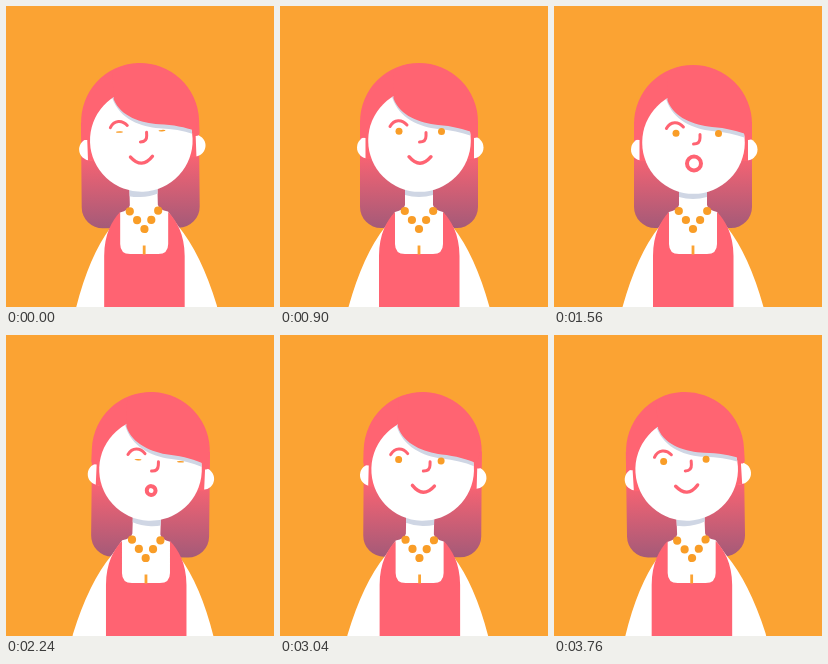
An HTML page for the animation above (3800 ms loop, 268 by 301 pixels).

```html
<!DOCTYPE html>
<html lang="en">
<head>
<meta charset="utf-8">
<title>Swaying portrait</title>
<style>
  html, body { margin: 0; width: 100%; height: 100%; overflow: hidden; background: #fba333; }
  svg { display: block; width: 100%; height: 100%; }
  .line { fill: none; stroke: #ff6372; stroke-linecap: round; }
</style>
</head>
<body>
<svg viewBox="0 0 268 301">
  <defs>
    <linearGradient id="fade" gradientUnits="userSpaceOnUse" x1="0" y1="144" x2="0" y2="222">
      <stop offset="0" stop-color="#ff6472"/>
      <stop offset="1" stop-color="#a45a78"/>
    </linearGradient>
    <clipPath id="neckClip"><rect x="125" y="170" width="28" height="40"/></clipPath>
    <clipPath id="faceClip"><circle cx="139.5" cy="134.5" r="51.3"/></clipPath>
  </defs>
  <rect width="268" height="301" fill="#fba333"/>

  <path id="backHair" fill="url(#fade)" d="M80 116H198V201A21 21 0 0 1 177 222H101A21 21 0 0 1 80 201Z"/>

  <g id="body">
    <path fill="#fff" d="M125 170V199Q124 204 115 206L105 221Q83 249 68.500 301L64 325H214L209.500 301Q195 249 173 221L163 206Q154 204 153 199V170Z"/>
    <g clip-path="url(#neckClip)"><circle id="chinShade" cx="139" cy="139" r="52" fill="#cfd6e4"/></g>
    <g id="beads" fill="#f99d27"></g>
  </g>
  <g id="dress">
    <path fill="#ff6372" d="M115 206V238Q115 248 125 248H153Q163 248 163 238V206C171 214 179.500 228 179.500 250V325H99V250C99 228 107 214 115 206Z"/>
    <path d="M139 239.500V248.500" stroke="#fba333" stroke-width="2.800"/>
  </g>

  <g id="head">
    <circle cx="88" cy="141.500" r="11" fill="#fff"/>
    <circle cx="192.500" cy="141.500" r="11" fill="#fff"/>
    <path fill="#ff6472" d="M80 116A59 59 0 0 1 198 116V129Q198 132 194 132V153H85.500V132Q80 132 80 129Z"/>
    <circle cx="139.500" cy="134.500" r="51.300" fill="#fff"/>
    <g clip-path="url(#faceClip)">
      <path fill="#cfd6e4" d="M112 91C119 113 140 121 158 123C172 124 184 127 194 131V80H113Z"/>
    </g>
    <path fill="#ff6472" d="M113.500 92.500C120 110 140 117 158 119C172 120 184 123 194 127L197 112A58 58 0 0 0 113 64Z"/>
  </g>

  <g id="face">
    <path id="brow" class="line" stroke-width="3" d="M110 120.500C114 113 122 113 127 119"/>
    <path class="line" stroke-width="3" d="M146 126.500V130Q146 136 139.500 136"/>
    <ellipse id="eyeL" cy="125.300" rx="3.500" fill="#f99d27"/>
    <ellipse id="eyeR" cy="125.500" rx="3.500" fill="#f99d27"/>
    <path id="smile" class="line" stroke-width="3.400"/>
    <circle id="ring" class="line" cx="140" cy="155.500" stroke-width="4"/>
  </g>
</svg>
<script>
  const LOOP = 3800;
  const $ = id => document.getElementById(id);
  const set = (id, attrs) => {
    for (const k in attrs) $(id).setAttribute(k, attrs[k]);
  };

  // Smooth step from 0 to 1 between the times a and b.
  function ease(t, a, b) {
    const p = Math.min(1, Math.max(0, (t - a) / (b - a)));
    return p * p * (3 - 2 * p);
  }

  // Eyelid opening: shut around the time mid.
  const blink = (t, mid) => .22 + .78 * ease(Math.abs(t - mid), 40, 130);

  for (let i = -2; i <= 2; i++) {
    $("beads").innerHTML += `<circle cx="${139 + 7.1 * i}" cy="${223 - 9 * Math.abs(i)}" r="4.1"/>`;
  }

  function draw(t) {
    // Right, centre, pause, right again, then left.
    const sway = -8.4 + 14.4 * ease(t, -160, 360) - 6 * ease(t, 360, 900)
      + 6.4 * ease(t, 1600, 2340) - 14.7 * ease(t, 2840, 3600);
    const dip = 2 * (ease(t, 1050, 1350) - ease(t, 1750, 2150));
    const gaze = 3 * ease(t, 1050, 1350) + 3.5 * ease(t, 1650, 2150)
      - 11 * ease(t, 2700, 3000) + 4 * ease(t, 3100, 3550);
    const lid = Math.min(blink(t, 20), blink(t, 2240));
    const grin = 1 - ease(t, 1050, 1200) + ease(t, 2440, 2620);
    const ring = 7 * ease(t, 1140, 1340) - 2.6 * ease(t, 1700, 2240) - 4.4 * ease(t, 2320, 2480);

    const shift = `translate(${sway} ${dip})`;
    const tilt = sway * .42;
    set("backHair", { transform: `translate(${sway} 0) rotate(${sway * .1} 139 110)` });
    set("body", { transform: `rotate(${sway * .27} 139 247)` });
    set("dress", { transform: `translate(${sway * .16} 0)` });
    set("chinShade", { cx: 139 + sway * .7, cy: 139 + dip });
    set("head", { transform: `${shift} rotate(${tilt} 139 110)` });
    set("face", { transform: `${shift} rotate(${tilt} 139 135)` });

    set("brow", { transform: `translate(${gaze * .8} 0)` });
    set("eyeL", { cx: 119 + gaze, ry: 3.5 * lid });
    set("eyeR", { cx: 161.5 + gaze, ry: 3.5 * lid });

    const w = 11 * grin;
    set("smile", {
      d: `M${140 - w} 150.7Q140 ${150.7 + 13 * grin} ${140 + w} 150.7`,
      visibility: grin > .1 ? "visible" : "hidden"
    });
    set("ring", { r: Math.max(0, ring), visibility: ring > 1 ? "visible" : "hidden" });
  }

  const start = performance.now();
  function tick(now) {
    draw(Math.max(0, now - start) % LOOP);
    requestAnimationFrame(tick);
  }
  draw(0);
  requestAnimationFrame(tick);
</script>
</body>
</html>
```
